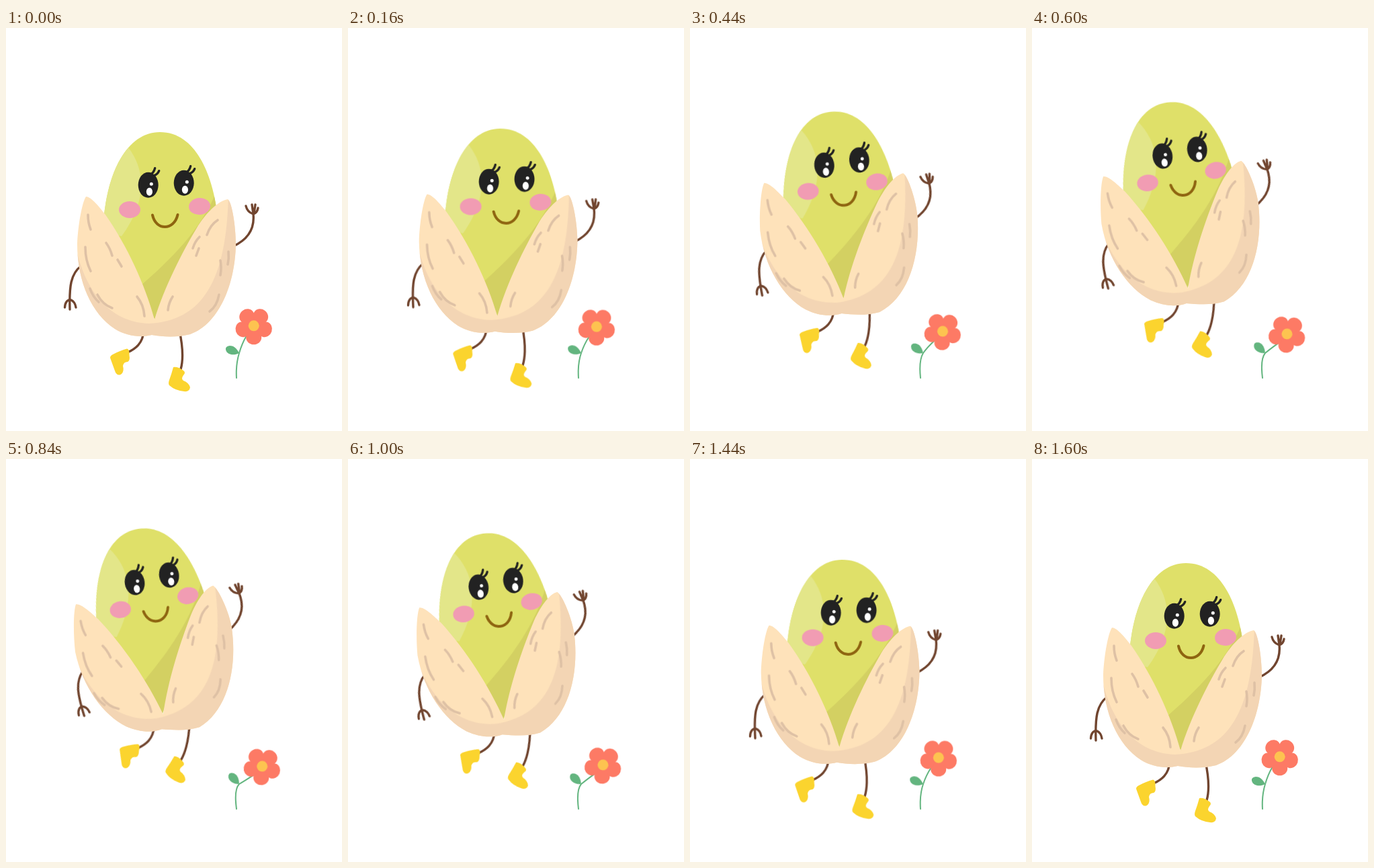
Write an HTML page without scripts that moves like this. It is 500 px wide and 600 px high and loops after 1680 ms.

```html
<!DOCTYPE html>
<html lang="en">
<head>
<meta charset="utf-8">
<title>Dancing pistachio</title>
<style>
  html, body { margin: 0; width: 100%; height: 100%; overflow: hidden; background: #fff; }
  svg { display: block; width: 100%; height: 100%; }

  /* Half a cosine up, half down, then a short rest */
  .sway, .stem, .shell { animation: sway 1680ms cubic-bezier(.364, 0, .636, 1) infinite; }
  .stem { animation-name: bend; }
  .shell { animation-name: lean; }
  @keyframes sway {
    0%, 95.24%, 100% { transform: none; }
    47.62% { transform: var(--to); }
  }
  @keyframes bend {
    0%, 95.24%, 100% { d: path("M343 521C342 505 344 494 347 484Q351 470 358 458"); }
    47.62% { d: path("M343 521C341 506 341 490 347 484Q354 480 368 471"); }
  }
  @keyframes lean {
    0%, 95.24%, 100% { d: path("M119 251C127 251 140 268 148 278C180 324 207 382 221 434C236 385 262 334 286 294C302 270 318 257 330 255C336 258 342 295 342 322C341 380 318 440 274 456C254 461 234 460 217 457C200 461 180 459 162 448C128 426 106 378 106 322C107 295 113 260 119 251Z"); }
    47.62% { d: path("M104 216C112 215 127 229 137 238C175 278 211 331 234 380C241 330 258 276 275 232C286 206 298 191 308 188C315 191 333 228 336 252C344 309 331 373 288 399C268 405 250 403 232 402C217 408 198 406 179 398C145 381 114 339 103 287C100 261 100 226 104 216Z"); }
  }

  .body { transform-origin: 227.6px 353px; --to: translate(-2.2px, -54.8px) rotate(-9deg) scale(.985, .993); }
  .arm-left { transform-origin: 108px 357px; --to: translate(4px, -38px) rotate(-16deg); }
  .arm-right { transform-origin: 343px 322px; --to: translate(-7px, -72px) rotate(-17deg); }
  .leg-left { --to: translate(15.5px, -53px); }
  .boot-left { transform-origin: 182px 482px; --to: rotate(12deg); }
  .leg-right { transform-origin: 260px 459px; --to: translate(13px, -58.5px) rotate(15deg); }
  .leaf { transform-origin: 347px 484px; --to: rotate(26deg); }
  .bloom { transform-origin: 368.7px 443.3px; --to: translate(12.6px, 14.3px) rotate(5deg); }

  .line, .stem { fill: none; stroke-linecap: round; stroke-linejoin: round; }
  .limb { stroke: #71452f; stroke-width: 3.4; }
  .boot { fill: #fbd42e; }
  .green { fill: #63b57f; }
</style>
</head>
<body>
<svg viewBox="0 0 500 600">
  <defs>
    <path id="head" d="M229 155C282 155 307 218 314 275L222 435L145 290C150 215 180 155 229 155Z"/>
    <clipPath id="in-head"><use href="#head"/></clipPath>
    <clipPath id="in-shell"><path class="shell"/></clipPath>
    <ellipse id="petal" cx="368.7" cy="460.8" rx="11.5" ry="10.5"/>
    <g id="eye">
      <ellipse rx="15" ry="19" fill="#222"/>
      <ellipse cx="1.7" cy="10" rx="4.6" ry="6" fill="#fff"/>
      <circle cx="4.6" cy="-1.5" r="2.5" fill="#fff"/>
      <path class="line" d="M2 -15Q8 -17 10 -25M9 -14Q14 -16 16 -21" stroke="#222" stroke-width="3.4"/>
    </g>
  </defs>

  <g>
    <path class="stem" stroke="#63b57f" stroke-width="2"/>
    <path class="sway leaf green" d="M347 484C343 476 338 473 333 473Q326 474 327 479C329 487 339 488 347 484Z"/>
    <g class="sway bloom" fill="#fd7a65">
      <circle cx="368.7" cy="443.3" r="15"/>
      <use href="#petal"/>
      <use href="#petal" transform="rotate(72 368.7 443.3)"/>
      <use href="#petal" transform="rotate(144 368.7 443.3)"/>
      <use href="#petal" transform="rotate(216 368.7 443.3)"/>
      <use href="#petal" transform="rotate(288 368.7 443.3)"/>
      <circle cx="368.7" cy="443.3" r="8" fill="#fdc350"/>
    </g>
  </g>

  <path class="sway arm-left line limb" d="M112 354C96 366 94 385 95 419M87.500 416C88 408 91 406 95 404C100 406 103 409 104 416"/>
  <path class="sway arm-right line limb" d="M338 325C362 314 370 297 368 277L366 263M357 265Q359 274 368 277Q374 275 375 268M369 276L371 263"/>

  <g class="sway leg-left">
    <path class="line limb" d="M205 450C204 470 192 478 181 483"/>
    <path class="sway boot-left boot" d="M159 486Q170 480 180 477.5Q184 478 183.5 487Q185 495 181 497Q175 497 174 503Q176 511 172 515Q167 519 163 513Q160 505 155 491Q155 488 159 486Z"/>
  </g>
  <g class="sway leg-right">
    <path class="line limb" d="M258 450C264 478 264 494 260 508"/>
    <path class="boot" d="M249 505Q256 504 264 510Q268 513 264 517Q260 522 264 525Q272 528 274 535Q273 542 265 541Q252 540 243 532Q241 529 243 524Q246 516 249 505Z"/>
  </g>

  <g class="sway body">
    <use href="#head" fill="#dfe069"/>
    <g clip-path="url(#in-head)">
      <path d="M182 178C208 212 210 258 172 310L130 300V178Z" fill="#e3e689"/>
      <path d="M312 246C290 300 245 345 200 384L222 442L325 280Z" fill="#d3d062"/>
    </g>
    <use href="#eye" x="211.700" y="233.700"/>
    <use href="#eye" x="264.700" y="230.700"/>
    <g fill="#f19cb3">
      <ellipse cx="184" cy="270.5" rx="16" ry="12.5"/>
      <ellipse cx="288" cy="265.5" rx="16" ry="12.5" transform="rotate(-5 288 265.5)"/>
    </g>
    <path class="line" d="M218 278.500C223 302 250 302 255.500 278" stroke="#8e6410" stroke-width="4"/>
  </g>

  <path class="shell" fill="#fee2ba"/>
  <g clip-path="url(#in-shell)">
    <g class="sway body">
      <path d="M106 335C118 385 150 438 213 440C290 436 330 380 331 240H370V490H90V335Z" fill="#f3d5b4"/>
      <path class="line" stroke="#dec1a5" stroke-width="3.600" d="M122 278Q122 290 126 300M118 326Q118 346 126 362M149 320Q155 328 158 339M166 345L172 355M125 388Q129 400 138 408M136 397Q144 412 158 417M195 400Q205 412 206 429
        M315 286Q304 293 299 308M288 311Q281 318 278 328M287 328L283 339M331 333Q332 343 330 352M319 346Q321 357 319 368M317 397Q314 414 303 422M248 400Q242 409 241 420"/>
    </g>
  </g>
</svg>
</body>
</html>
```
